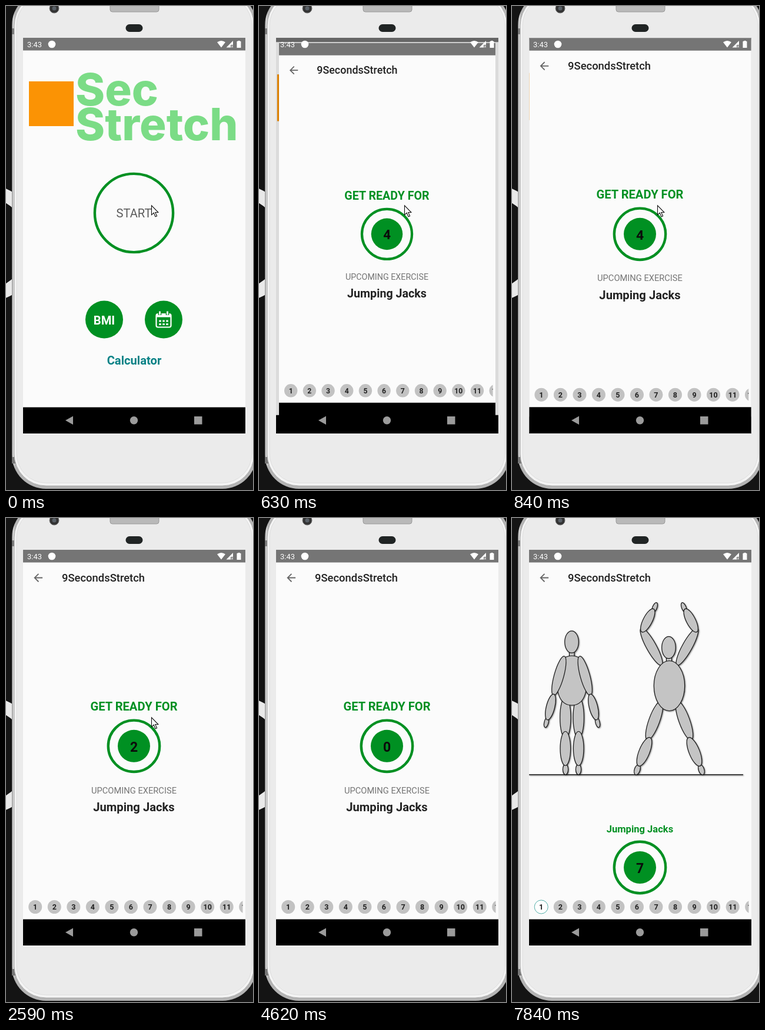
An HTML page for the animation above (8000 ms loop, 420x822 px).

```html
<!DOCTYPE html>
<html lang="en">
<head>
<meta charset="utf-8">
<title>Workout timer</title>
<style>
html, body { margin: 0; width: 100%; height: 100%; overflow: hidden; background: #111; }
svg { display: block; width: 420px; height: 822px; }
text { font-family: Roboto, "Noto Sans", sans-serif; font-size: 20.2px; text-anchor: middle; }
.b { font-weight: 700; }
.green { fill: #009022; }
.ring { fill: none; stroke: #009022; stroke-width: 4.4; }
.digit { font-size: 23px; font-weight: 700; fill: #0b0b0b; }
.row text { font-size: 12.6px; font-weight: 700; fill: #222; }
.brand { font-family: Inter, sans-serif; font-weight: 800; fill: #7bdc86; text-anchor: start; }
#dolls { fill: #c4c4c4; stroke: #141414; stroke-width: 1.2; filter: drop-shadow(1.5px 1.5px 1px #777); }
</style>
</head>
<body>
<svg viewBox="0 0 420 822">
  <defs>
    <clipPath id="screen"><rect x="29" y="54" width="378" height="672"/></clipPath>
    <clipPath id="list"><rect x="33" y="640" width="369.5" height="40"/></clipPath>
    <linearGradient id="metal">
      <stop offset="0" stop-color="#8c8c8c"/><stop offset=".006" stop-color="#d8d8d8"/>
      <stop offset=".013" stop-color="#b4b4b4"/><stop offset=".98" stop-color="#b4b4b4"/>
      <stop offset="1" stop-color="#ddd"/>
    </linearGradient>
  </defs>

  <rect width="420" height="822" fill="#141414"/>
  <circle cx="-40" cy="403" r="90" fill="none" stroke="#e9e9e9" stroke-width="22"/>

  <!-- phone body -->
  <rect x="10" y="-25" width="416" height="845" rx="58" fill="url(#metal)"/>
  <path d="M10 38h7v10h-7zM10 766h7v11h-7z" fill="#777"/>
  <rect x="14" y="-21" width="408" height="836" rx="54" fill="#f4f4f4" stroke="#aaa"/>
  <rect x="18" y="-17" width="400" height="827" rx="50" fill="#ebebeb" stroke="#dedede"/>
  <circle cx="82" cy="4" r="8" fill="#333" stroke="#777"/>
  <circle cx="82" cy="4" r="3.5" fill="#596067"/>
  <rect x="177" y="-5" width="83" height="15" rx="4" fill="#b9b9b9" stroke="#999"/>
  <rect x="203.5" y="31" width="29" height="13" rx="6.5" fill="#202424"/>

  <g clip-path="url(#screen)">
    <g id="home">
      <path d="M-20 20h480v740H-20z" fill="#fbfbfb"/>
      <path d="M-20 20h480v55.500H-20z" fill="#757575"/>
      <path d="M-20 681.500h480v90H-20z"/>
      <rect x="39" y="128" width="76" height="76" fill="#fb9304"/>
      <text class="brand" x="118" y="169" style="font-size:76px">Sec</text>
      <text class="brand" x="118" y="228" style="font-size:76px">Stretch</text>
      <circle class="ring" cx="217.5" cy="351.5" r="66.6"/>
      <text x="217.5" y="359" fill="#5b5b5b">START</text>
      <g class="green"><circle cx="167" cy="532.5" r="32"/><circle cx="268" cy="532.5" r="32"/></g>
      <text class="b" x="167" y="540.5" fill="#fff">BMI</text>
      <g fill="none" stroke="#fff" stroke-width="2.2">
        <rect x="255.5" y="523" width="25" height="22.5" rx="3"/>
        <path d="M255 526h26" stroke-width="5"/>
        <path d="M261.500 519v6M274.500 519v6" stroke="#009022" stroke-width="5.5"/>
        <path d="M261.500 518.500v6M274.500 518.500v6" stroke-width="2.8"/>
        <path d="M260.300 535h16M260.300 540.500h16" stroke-width="3.2" stroke-dasharray="3.500 2.500"/>
      </g>
      <text class="b" x="218" y="609" fill="#088286">Calculator</text>
    </g>
    <rect id="dim" x="29" y="54" width="378" height="672"/>

    <g id="app"><g clip-path="url(#screen)">
      <path d="M29 54h378v672H29z" fill="#fbfbfb"/>
      <path d="M29 54h378v21.500H29z" fill="#757575"/>
      <path d="M29 681.500h378v45H29z"/>
      <path transform="translate(43.700 90.500) scale(.92)" fill="#666"
        d="M20 11H7.830l5.590-5.590L12 4l-8 8 8 8 1.410-1.410L7.830 13H20z"/>
      <text x="95" y="108" fill="#222" style="font-size:18.4px;font-weight:500;text-anchor:start">9SecondsStretch</text>
      <g id="ready">
        <text class="b green" x="217.5" y="327">GET READY FOR</text>
        <text x="217.5" y="467.5" fill="#757575" style="font-size:14.7px">UPCOMING EXERCISE</text>
        <text class="b" x="217.5" y="498" fill="#222">Jumping Jacks</text>
      </g>
      <g id="exercise">
        <g id="dolls"></g>
        <text class="b green" x="217.5" y="534" style="font-size:16.55px">Jumping Jacks</text>
      </g>
      <g id="timer">
        <circle class="ring" cx="217.5" r="43.7"/>
        <circle class="green" cx="217.5" r="27.5"/>
        <text class="digit" id="digit" x="217.6" y="9.2"></text>
      </g>
      <g class="row" id="row" clip-path="url(#list)"></g>
    </g></g>

    <!-- system icons -->
    <g fill="#fff">
      <text x="48.5" y="69.7" style="font-size:12.9px">3:43</text>
      <circle cx="78" cy="65" r="6.3"/>
      <path d="M359 61.500Q366 56.500 373 61.500L366 70.500zM386 59v11.500h-11.500zM394 59h4v1h1.500v11h-7V60h1.500z"/>
    </g>
    <path d="M382 66h4v4.500h-4z" fill="#757575"/>
    <path d="M383 67l3 3m0-3l-3 3" stroke="#fff"/>
    <path d="M101 703.800l13-7.300v14.600zM320 697h13.500v13.500H320z" fill="#9b9b9b"/>
    <circle cx="217.5" cy="703.8" r="6.7" fill="#9b9b9b"/>
  </g>

  <path id="cursor" d="M.5 .8v16l3.700-3.500 2.800 6.500 2.600-1.100-2.800-6.200h5z" fill="#fff" stroke="#111" stroke-width="1.1"/>
</svg>
<script>
const $ = id => document.getElementById(id);
const show = (id, on) => $(id).style.display = on ? '' : 'none';

const oval = (x, y, rx, ry, a = 0) =>
  `<ellipse rx="${rx}" ry="${ry}" transform="translate(${x} ${y}) rotate(${a})"/>`;
// a limb and its mirror image about the body axis
const pair = (axis, x, y, rx, ry, a) => oval(x, y, rx, ry, a) + oval(2 * axis - x, y, rx, ry, -a);

const standing = (...limb) => pair(102, ...limb);
const jumping = (...limb) => pair(267.5, ...limb);
$('dolls').innerHTML =
  '<path d="M29 436H393" stroke-width="1.6"/>' +
  standing(91, 427, 4.6, 9, 0) + standing(90.8, 339, 9.2, 35, 0) + standing(90.8, 391.5, 8.8, 29, 0) +
  '<path d="M97.500 227h8.500v9h-8.500z"/>' +
  '<path d="M88 238Q101.700 230 115.500 238L126 293Q121 318 101.700 318T77.500 293z"/>' +
  oval(101.5, 210.5, 11.8, 18.7) +
  standing(58.5, 347, 3.6, 9, 14) + standing(79.8, 268, 8.2, 34.5, 15.5) + standing(65.5, 321, 7.2, 22.5, 14) +
  jumping(213, 427.5, 4.8, 9, 18) + jumping(242, 344, 9.2, 35, 20) + jumping(225, 397, 9, 26, 22) +
  '<path d="M262.500 237h9v9h-9z"/>' +
  jumping(242.7, 152, 3.8, 8.8, 22) + jumping(237, 218.5, 8.4, 36, -29) + jumping(230.8, 174, 7.8, 22, 27) +
  oval(267.5, 285, 26.2, 42.5) + oval(266.5, 220, 11.8, 18.7);

for (let i = 0; i < 12; i++) {
  const x = 49.7 + 32.55 * i;
  $('row').innerHTML += `<circle cx="${x}" cy="660.5" r="11.5" fill="#c2c2c2"/>` +
    `<text x="${x}" y="665">${i + 1}</text>`;
}
const first = $('row').firstChild;
first.setAttribute('stroke-width', .8);

const zoom = (id, s) =>
  $(id).setAttribute('transform', `translate(218 390) scale(${s}) translate(-218 -390)`);

const opening = [.11, .823, .937, .978, .993, 1];
const digits = [[0, 4], [1470, 3], [2590, 2], [3570, 1], [4620, 0], [5670, ''], [5740, 9], [6790, 8], [7840, 7]];

function draw(t) {
  const step = Math.floor((t - 560) / 70);
  const p = step < 0 ? 0 : opening[Math.min(step, 5)];
  zoom('home', 1 + .055 * p);
  zoom('app', .85 + .15 * p);
  show('app', step > 0);
  $('dim').setAttribute('opacity', .13 * Math.min(1, p * 3));

  const active = t >= 5670;
  show('ready', !active);
  show('exercise', active);
  $('timer').setAttribute('transform', `translate(0 ${active ? 593.5 : 387.3})`);
  $('digit').textContent = digits.findLast(d => t >= d[0])[1];
  first.setAttribute('fill', active ? '#fff' : '#c2c2c2');
  first.setAttribute('stroke', active ? '#2a9a92' : 'none');

  // the pointer speeds up and leaves through the top
  const k = Math.max(0, Math.floor((t - 2730) / 70)) / 3;
  show('cursor', k <= 1);
  $('cursor').setAttribute('transform', `translate(${247 - 21 * k * k} ${338 - 296 * k * k})`);
}

const start = performance.now();
function tick() {
  draw((performance.now() - start) % 8000);
  requestAnimationFrame(tick);
}
tick();
</script>
</body>
</html>
```
